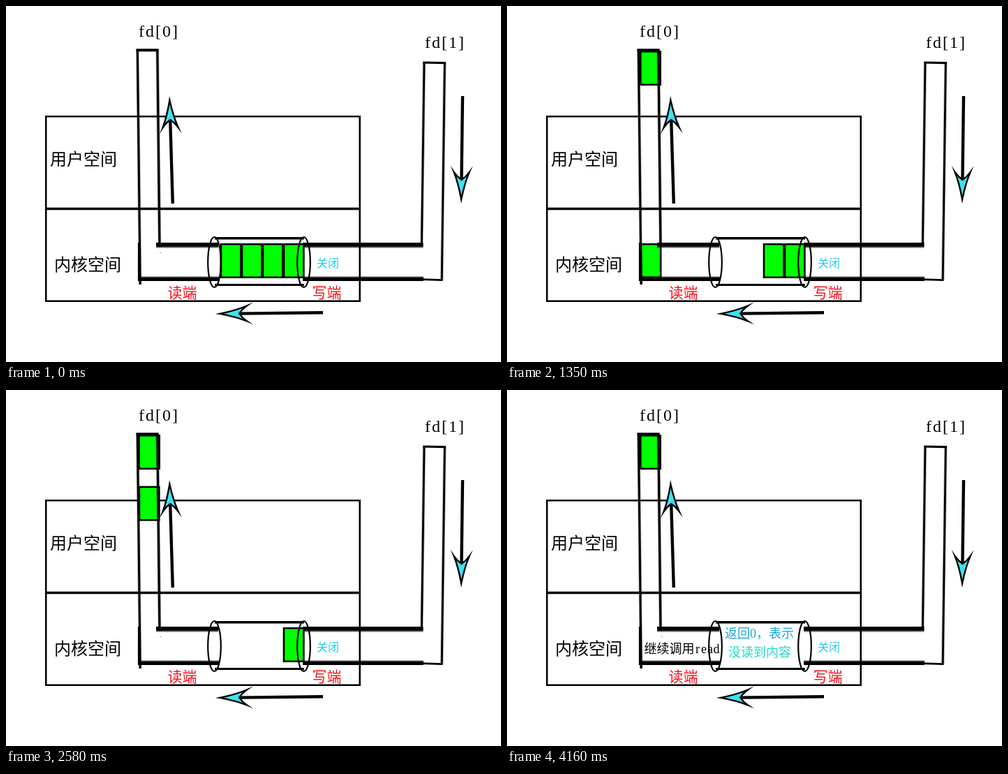
An HTML page with a canvas that plays this animation: 709x510 px, repeating every 4560 ms.

```html
<!DOCTYPE html>
<html lang="zh">
<head>
<meta charset="utf-8">
<title>Pipe read</title>
<style>
html, body { margin: 0; width: 100%; height: 100%; overflow: hidden; background: #fff; }
canvas { display: block; }
</style>
</head>
<body>
<canvas id="stage" width="709" height="510"></canvas>
<script>
const ctx = document.getElementById('stage').getContext('2d');
const LOOP = 4560, STEP = 30, PAUSE_STEP = 124, PAUSE = 200;
const CJK = '"Noto Sans CJK SC", "Noto Sans CJK", "Noto Sans CJK JP", sans-serif';
const SERIF = '"Liberation Serif", "Noto Serif", serif';

const lerp = (a, b, p) => a + (b - a) * p;

function line(x1, y1, x2, y2, w) {
  ctx.strokeStyle = '#000';
  ctx.lineWidth = w;
  ctx.beginPath();
  ctx.moveTo(x1, y1);
  ctx.lineTo(x2, y2);
  ctx.stroke();
}

// Draws on a fixed grid: Latin glyphs take half a cell, Chinese a full one.
function label(text, x, base, size, color) {
  ctx.fillStyle = color;
  for (const ch of text) {
    const latin = ch < '\u0100';
    const cell = latin ? size / 2 : size;
    ctx.font = `${size}px ${latin ? SERIF : CJK}`;
    ctx.textAlign = 'center';
    ctx.fillText(ch, x + cell / 2, base);
    x += cell;
  }
}

// Horizontal wall, solid outside and soft on the inner side.
function wall(x1, x2, outer, inner) {
  const g = ctx.createLinearGradient(0, outer, 0, inner);
  g.addColorStop(0, '#000');
  g.addColorStop(0.6, '#000');
  g.addColorStop(1, 'rgba(0,0,0,0)');
  ctx.fillStyle = g;
  ctx.fillRect(x1, Math.min(outer, inner), x2 - x1, Math.abs(inner - outer));
}

function softLine(x1, y1, x2, y2, w) {
  ctx.globalAlpha = 0.3;
  line(x1, y1, x2, y2, w + 1.6);
  ctx.globalAlpha = 1;
  line(x1, y1, x2, y2, w);
}

function arrow(tailX, tailY, tipX, tipY) {
  const len = Math.hypot(tipX - tailX, tipY - tailY);
  ctx.save();
  ctx.translate(tipX, tipY);
  ctx.rotate(Math.atan2(tipY - tailY, tipX - tailX));
  line(-len, 0, -32, 0, 4.4);
  ctx.beginPath();
  ctx.moveTo(-5, 0);
  ctx.quadraticCurveTo(-28, 4.5, -44, 11);
  ctx.quadraticCurveTo(-37, 6, -33, 0);
  ctx.quadraticCurveTo(-37, -6, -44, -11);
  ctx.quadraticCurveTo(-28, -4.5, -5, 0);
  ctx.closePath();
  ctx.fillStyle = '#40e0f0';
  ctx.fill();
  ctx.lineWidth = 2.4;
  ctx.stroke();
  ctx.restore();
}

function ring(x) {
  ctx.strokeStyle = '#000';
  ctx.lineWidth = 2.2;
  ctx.beginPath();
  ctx.ellipse(x, 367, 9.3, 36, 0, 0, Math.PI * 2);
  ctx.stroke();
}

function frameBox() {
  ctx.strokeStyle = '#000';
  ctx.lineWidth = 2.5;
  ctx.strokeRect(57.25, 158.25, 449.5, 264.5);
  line(57, 290.5, 507, 290.5, 3.6);
}

// Each block takes 15 steps to the corner, then 15 steps up.
function block(i, step) {
  const s = Math.min(30, Math.max(0, step - i * 30));
  const edge = i === 0 || i === 3;
  const cornerX = edge ? 191.5 : 190.5, topX = edge ? 190 : 189.3;
  let x, y = 340;
  if (s <= 15) {
    x = lerp(306.7 + i * 30, cornerX, s / 15);
  } else {
    const p = (s - 15) / 15;
    x = lerp(cornerX, topX, p);
    y = lerp(340, 64, p);
  }
  ctx.fillStyle = '#000';
  ctx.fillRect(x, y, 31, 50);
  ctx.fillStyle = '#0f0';
  ctx.fillRect(x + 2.6, y + 2.5, 25.8, 45);
}

function pipes() {
  // read side
  softLine(188.3, 62, 192.2, 399, 3);
  softLine(216.8, 62, 220, 345, 3.2);
  line(186.5, 63.2, 218.5, 63.2, 4);
  line(190.6, 339, 190.6, 394, 3.4);
  wall(215, 304, 339, 347.5);
  wall(190, 305, 394, 386.5);
  ctx.fillStyle = '#999';
  ctx.fillRect(220.5, 353, 2, 1);
  // write side
  softLine(599, 80, 595.4, 344, 2.8);
  softLine(628.4, 81, 624.2, 393, 2.8);
  line(597.5, 81, 630, 81.6, 3.2);
  line(594, 391.6, 625.5, 392.6, 2.6);
  wall(425, 597.5, 339, 347.5);
  wall(425, 598, 394, 386.5);
  // buffer
  line(299, 332.8, 427, 332.8, 3.6);
  line(299, 399.4, 427, 399.4, 3);
  ring(298.5);
  ring(426.5);
}

function labels() {
  label('fd[0]', 188, 44, 24, '#000');
  label('fd[1]', 598, 60, 24, '#000');
  label('用户空间', 63, 228, 24, '#000');
  label('内核空间', 69, 379, 24, '#000');
  label('读端', 231.5, 418, 21, '#f5101c');
  label('写端', 438.5, 418, 21, '#f5101c');
  label('关闭', 445, 374, 16, '#22cbe2');
}

function typed(parts, n) {
  return parts.slice(0, Math.max(0, n)).join('');
}

function messages(step) {
  label(typed(['继', '续', '调用', 'read'], step - 120), 196.5, 377, 18, '#000');
  const n = step - PAUSE_STEP;
  label(typed(['返', '回', '0，', '表示'], n), 312, 355, 18, '#1ba6df');
  label(typed([...'没读到内容'], n - 4), 317, 382, 18, '#20dcc6');
}

function stepAt(t) {
  const run = PAUSE_STEP * STEP;
  if (t < run) return Math.floor(t / STEP + 1e-4);
  const after = Math.floor((t - run - PAUSE) / STEP + 1e-4);
  return PAUSE_STEP + Math.min(9, Math.max(0, after + 1));
}

function draw(t) {
  const step = stepAt(t);
  ctx.fillStyle = '#fff';
  ctx.fillRect(0, 0, 709, 510);
  frameBox();
  for (let i = 0; i < 4; i++) block(i, step);
  pipes();
  arrow(238.8, 283, 234.2, 130);
  arrow(654, 129, 652, 282);
  arrow(454, 439.2, 301, 441);
  labels();
  messages(step);
}

const start = performance.now();
function tick() {
  draw((performance.now() - start) % LOOP);
  requestAnimationFrame(tick);
}
tick();
</script>
</body>
</html>
```
